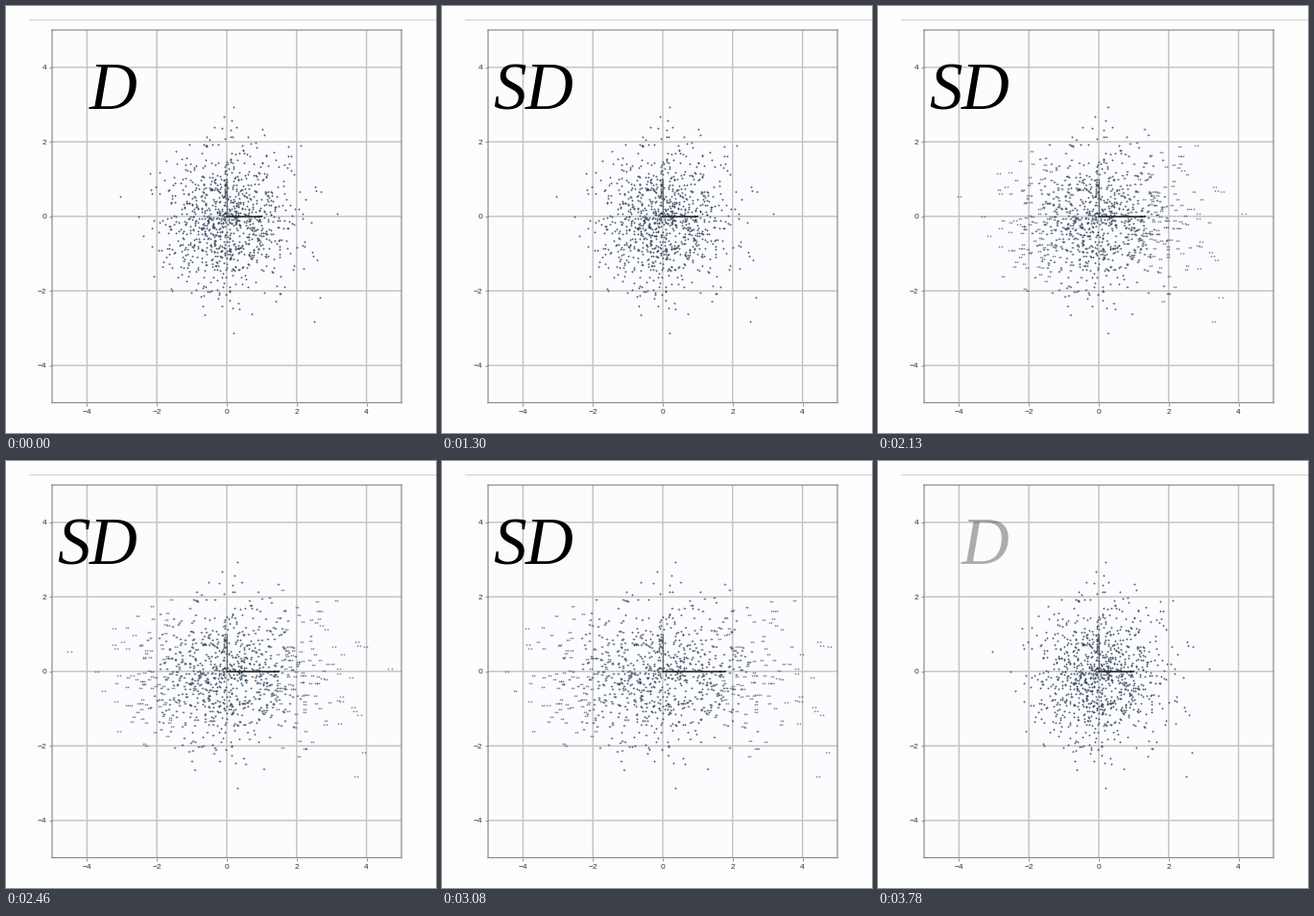
Recreate the animation shown at these times as a matplotlib script. Size 448 by 444 pixels, loop 3.85 s.

```python
import numpy as np
import matplotlib.pyplot as plt
from matplotlib.animation import FuncAnimation
from matplotlib.lines import Line2D

W, H, DPI = 448, 444, 100
LEFT, RIGHT, TOP, BOTTOM = 48, 412, 25, 412.5
LOOP, STEP = 3850, 35
RESET = 3570          # everything snaps back, D starts to fade in
S_IN = 680
FADE = 560
GROW_START, GROW_RATE = 1400, 0.468e-3


def px(n):
    """Pixels to points."""
    return n * 72 / DPI


def smooth(u):
    u = np.clip(u, 0, 1)
    return u * u * (3 - 2 * u)


def stretch(t):
    if t >= RESET:
        return 1.0
    return 1 + GROW_RATE * max(0, t - GROW_START)


def cloud(n=1000, sigma=0.95, reach=2.9):
    """Round normal cloud with a few stragglers that mark its extent."""
    pts = np.random.default_rng(7).normal(scale=sigma, size=(n, 2))
    pts = pts[np.hypot(*pts.T) < reach]
    ends = [(3.16, 0.08), (2.5, -2.83), (2.66, -2.17),
            (0.2, 2.93), (0.2, -3.13), (-3.05, 0.53)]
    return np.vstack([pts, ends]).T


plt.rcParams["font.family"] = "Liberation Sans"
fig = plt.figure(figsize=(W / DPI, H / DPI), dpi=DPI, facecolor="#fdfdfe")
fig.add_artist(Line2D([24 / W, 1], [1 - 14.5 / H] * 2, color="#cfcfcf", lw=px(1)))

ax = fig.add_axes([LEFT / W, 1 - BOTTOM / H, (RIGHT - LEFT) / W, (BOTTOM - TOP) / H],
                  facecolor="#fcfcfe")
ticks = range(-4, 5, 2)
ax.set(xlim=(-5, 5), ylim=(-5, 5), xticks=ticks, yticks=ticks)
ax.set_axisbelow(True)
ax.grid(color="#c2c2c2", lw=px(1.4), snap=False)
ax.tick_params(length=px(3), width=px(0.8), pad=px(3), color="#777777",
               labelsize=px(8.3), labelcolor="#333333")
for spine in ax.spines.values():
    spine.set(color="#8a8a8a", linewidth=px(1.2), snap=False)

xs, ys = cloud()


def dots():
    return ax.plot(xs, ys, "o", ms=px(1.75), mew=0, color="#2c4258",
                   alpha=0.6, snap=False, zorder=3)[0]


now, trail = dots(), dots()
ax.plot([0, 0], [0, 1], color="#6a6a6a", lw=px(1.2), zorder=4)
base, = ax.plot([0, 1], [0, 0], color="#1c1c1c", lw=px(1.5), zorder=4)


def letter(char, x):
    return fig.text(x / W, 1 - 107 / H, char, family="Liberation Serif",
                    style="italic", size=px(69), color="black",
                    va="baseline", ha="left")


s_text = letter("S", 53.5)
d_text = letter("D", 86.5)


def draw(i):
    t = i * STEP
    k = stretch(t)
    # a half-strength previous position smears the moving dots
    before = k if t >= RESET else stretch(t - 2 * STEP)
    now.set_xdata(xs * k)
    trail.set_xdata(xs * before)
    base.set_xdata([0, k])
    s_text.set_alpha(smooth((t - S_IN) / FADE) if t < RESET else 0)
    d_text.set_alpha(smooth((t - RESET) / FADE) if t >= RESET else 1)
    return now, trail, base, s_text, d_text


anim = FuncAnimation(fig, draw, frames=LOOP // STEP, interval=STEP,
                     repeat=True, repeat_delay=0, blit=False)
plt.show()
```
